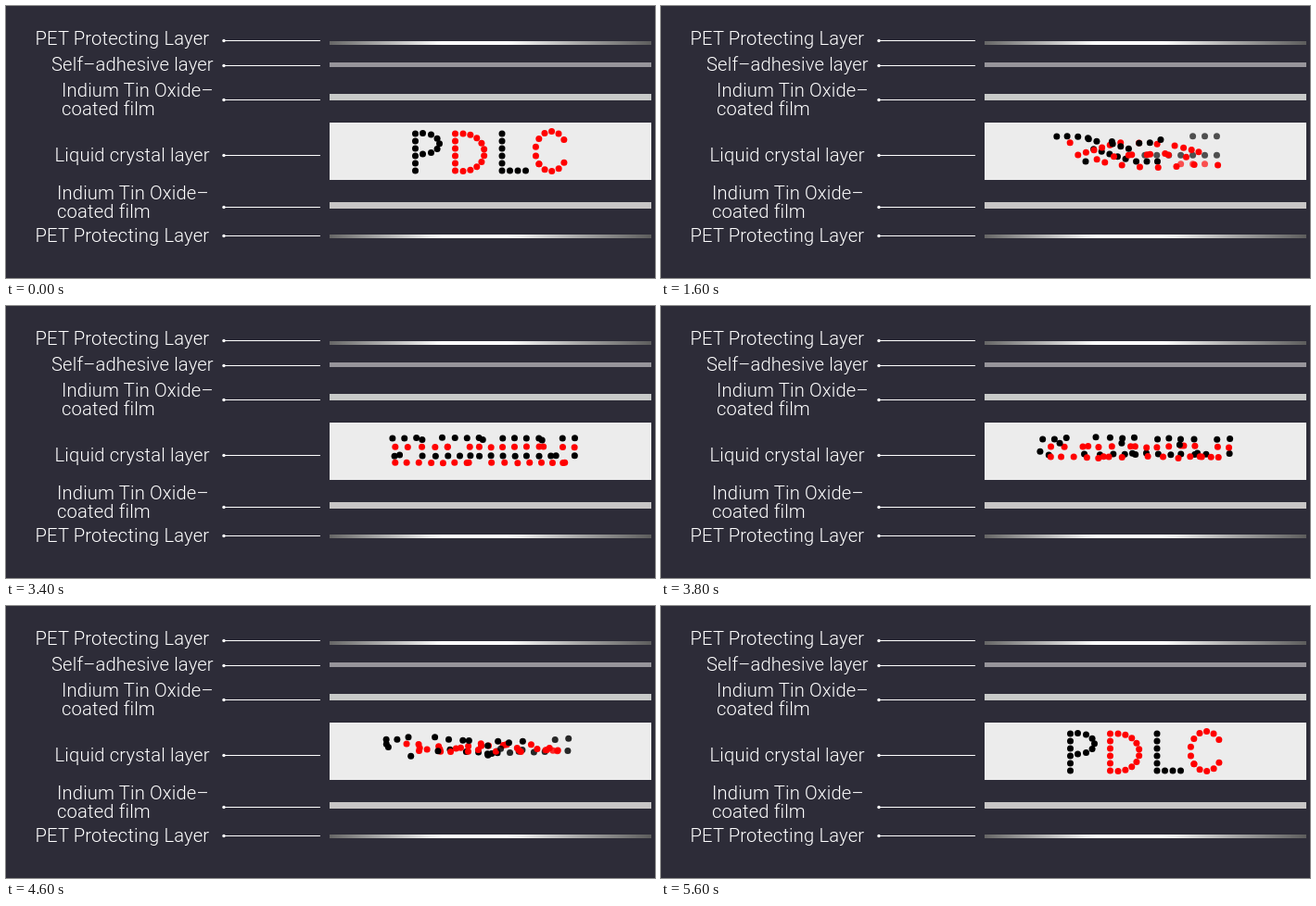
Write an HTML page that moves like this. It is 700 px wide and 294 px high and loops after 5800 ms.

```html
<!DOCTYPE html>
<html lang="en">
<head>
<meta charset="utf-8">
<title>PDLC film layers</title>
<style>
html, body { margin: 0; width: 100%; height: 100%; overflow: hidden; background: #2d2c38; }
svg { display: block; width: 700px; height: 294px; }
text { font: 300 20.2px Roboto, "Noto Sans", sans-serif; letter-spacing: .15px; fill: #fff; }
.leader line { stroke: #fff; stroke-width: 1; }
.leader circle { fill: #fff; }
.dot { animation: drift 5.8s steps(6, end) infinite; }
/* word -> grid -> scatter -> word, each move in six steps of 200 ms */
@keyframes drift {
  0%, 13.793% { cx: var(--word-x); cy: var(--word-y); fill-opacity: var(--seen); }
  34.482%, 55.172% { cx: var(--grid-x); cy: var(--grid-y); fill-opacity: 1; }
  75.862% { cx: var(--loose-x); cy: var(--loose-y); fill-opacity: 1; }
  96.551%, 100% { cx: var(--word-x); cy: var(--word-y); fill-opacity: var(--seen); }
}
</style>
</head>
<body>
<svg viewBox="0 0 700 294">
  <defs>
    <linearGradient id="sheen">
      <stop offset="0" stop-color="#666"/>
      <stop offset=".2" stop-color="#bcbcbc"/>
      <stop offset=".35" stop-color="#fff"/>
      <stop offset=".55" stop-color="#fff"/>
      <stop offset=".78" stop-color="#a6a6a6"/>
      <stop offset="1" stop-color="#5c5c5c"/>
    </linearGradient>
  </defs>
  <g>
    <text x="31.5" y="42">PET Protecting Layer</text>
    <text x="49" y="70">Self–adhesive layer</text>
    <text x="60" y="98">Indium Tin Oxide–</text>
    <text x="60" y="118">coated film</text>
    <text x="52.5" y="167.5">Liquid crystal layer</text>
    <text x="55" y="209">Indium Tin Oxide–</text>
    <text x="55" y="228.5">coated film</text>
    <text x="31.5" y="254.5">PET Protecting Layer</text>
  </g>
  <g id="leaders" class="leader"></g>
  <g>
    <rect x="349" y="38" width="347" height="4" fill="url(#sheen)"/>
    <rect x="349" y="61" width="347" height="5" fill="#97959b"/>
    <rect x="349" y="95" width="347" height="7" fill="#c8cac9"/>
    <rect x="349" y="126" width="347" height="62" fill="#ececec"/>
    <rect x="349" y="212" width="347" height="7" fill="#c8c6c6"/>
    <rect x="349" y="247" width="347" height="4" fill="url(#sheen)"/>
  </g>
  <g id="dots"></g>
</svg>
<script>
const $ = id => document.getElementById(id);

function add(parent, tag, attrs) {
  const el = document.createElementNS("http://www.w3.org/2000/svg", tag);
  for (const key in attrs) el.setAttribute(key, attrs[key]);
  parent.append(el);
  return el;
}

for (const y of [37.5, 64.5, 101.5, 161.5, 217.5, 248.5]) {
  add($("leaders"), "line", { x1: 235, x2: 339, y1: y, y2: y });
  add($("leaders"), "circle", { cx: 235, cy: y, r: 1.7 });
}

// Letters are stems and arcs of evenly spaced dots
const run = (n, point) => Array.from({ length: n }, (_, i) => point(i));
const stem = x => run(6, i => [x, 138 + 8 * i]);
const arc = (cx, cy, rx, ry, from, to, n) => run(n, i => {
  const a = (from + (to - from) * i / (n - 1)) * Math.PI / 180;
  return [cx + rx * Math.cos(a), cy + ry * Math.sin(a)];
});

// Each letter lists its dots in the order of their grid columns
function letterP() {
  const s = stem(441.5), b = arc(449.5, 148.8, 18, 11.3, -90, 90, 7);
  return [s[0], ...b.slice(0, 3), s[1], s[2], b[4], ...s.slice(3), b[6], b[5], b[3]];
}
function letterD() {
  const [top, ...rest] = stem(484.5), a = arc(493, 158.3, 23, 20.2, -90, 90, 10);
  const pairs = run(3, i => [a[i], a[9 - i]]).flat();
  return [top, ...rest.reverse(), ...pairs, ...a.slice(3, 7)];
}
function letterL() {
  const s = stem(535), foot = run(3, i => [543.5 + 8.5 * i, 178]);
  return [s.pop(), ...s, ...foot];
}
function letterC() {
  const dots = arc(588, 157, 17, 21.5, -35.5, -325, 12).sort((a, b) => a[0] - b[0]);
  dots[15] = dots[3];
  return dots;
}

let seed = 7;
function jitter(size) {
  seed = seed * 16807 % 2147483647;
  return (seed / 2147483647 * 2 - 1) * size;
}

// Scatter: a row rises, bulges sideways around one column,
// and every few dots one strays to the left
function scatter(row, i, [x, y]) {
  const stray = i % row.every === row.first;
  const bulge = row.bulge * Math.exp(-(((i - row.mid) / 2.5) ** 4));
  return [
    x + (stray ? -row.pull : bulge) + jitter(2.5),
    y - row.rise + (stray ? row.drop : 0) + jitter(2.5)
  ];
}

// Bottom to top
const rows = [
  { y: 163, color: "#000", word: letterL(), rise: 6, bulge: 32, mid: 4, every: 13, first: 1, pull: 46, drop: -4 },
  { y: 172.5, color: "#f00", word: letterC(), rise: 18, bulge: 18, mid: 11, every: 8, first: 7, pull: 65, drop: 0 },
  { y: 152.5, color: "#f00", word: letterD(), rise: 1, bulge: 28, mid: 4, every: 8, first: 5, pull: 48, drop: 0 },
  { y: 142.5, color: "#000", word: letterP(), rise: -1, bulge: -18, mid: 1, every: 5, first: 3, pull: 54, drop: 12 }
];

for (const row of rows) {
  for (let i = 0; i < 16; i++) {
    const grid = [419.5 + 12.93 * i, row.y];
    const hidden = [grid[0] - 42, row.y - 5];
    const poses = { word: row.word[i] || hidden, grid, loose: scatter(row, i, grid) };
    const { style } = add($("dots"), "circle", { class: "dot", r: 3.5, fill: row.color });
    for (const name in poses) {
      style.setProperty(`--${name}-x`, poses[name][0] + "px");
      style.setProperty(`--${name}-y`, poses[name][1] + "px");
    }
    style.setProperty("--seen", row.word[i] ? 1 : 0);
  }
}
</script>
</body>
</html>
```
